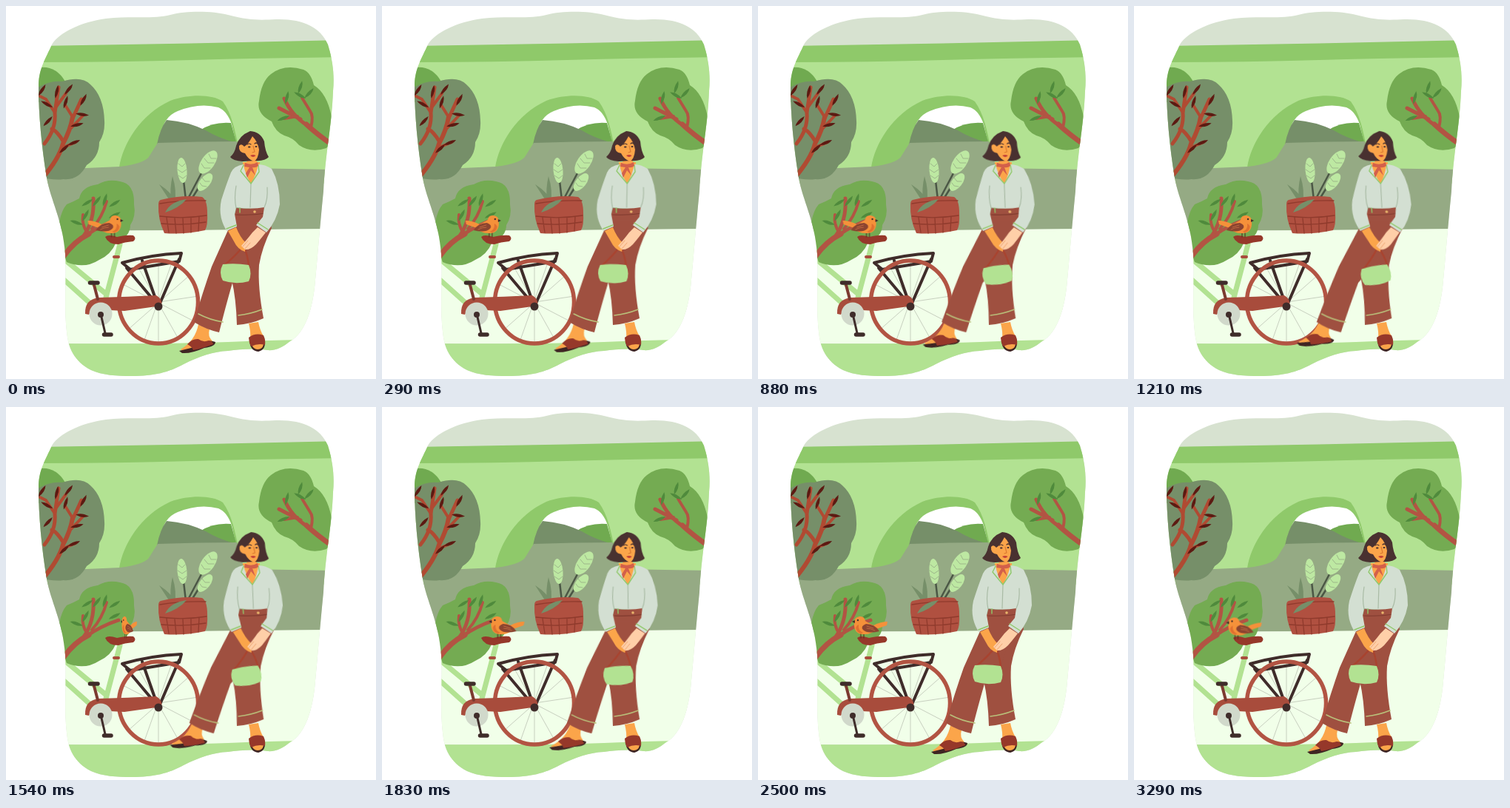
These frames come from a looping animation (500x504 px, 5 s). An HTML page without scripts:

```html
<!DOCTYPE html>
<html lang="en">
<head>
<meta charset="utf-8">
<title>Park afternoon</title>
<style>
html, body { margin: 0; width: 100%; height: 100%; overflow: hidden; background: #fff; }
svg { display: block; width: 100vw; height: 100vh; }
.line { fill: none; stroke-linecap: round; stroke-linejoin: round; }
.sway { animation: sway 5s cubic-bezier(.37, 0, .63, 1) infinite; }
.torso { --to: skewX(4.8deg); transform-origin: 0 213px; }
.front { --to: skewX(-4.6deg); transform-origin: 0 337px; }
.back { --to: skewX(-1.9deg); transform-origin: 0 430px; }
.foot { --to: translate(-13px, -3px) rotate(9deg); transform-origin: 283px 456px; }
.bag { --to: translate(9px, 1px) rotate(-12deg); transform-origin: 322px 325px; }
.head { --to: rotate(2deg); transform-origin: 331px 210px; }
.bird { animation: hop 5s linear infinite; }
.open { animation: open 5s step-end infinite; }
.shut { animation: shut 5s step-end infinite; }
@keyframes sway {
  0%, 50%, 100% { transform: none; }
  25% { transform: var(--to); }
}
@keyframes hop {
  0% { transform: translate(143.5px, 311px) scaleX(1); }
  11.6% { transform: translate(148px, 311px) scaleX(1); }
  24.2% { transform: translate(147px, 311px) scaleX(1); }
  27.5% { transform: translate(150px, 311px) scaleX(1); }
  30.8% { transform: translate(162px, 311px) scaleX(-.45); }
  33% { transform: translate(162px, 311px) scaleX(-1); }
  41.6% { transform: translate(156px, 311px) scaleX(-1); }
  44.2% { transform: translate(146px, 311px) scaleX(-1); }
  50% { transform: translate(142px, 311px) scaleX(-1); }
  65%, 100% { transform: translate(139.5px, 312.5px) scaleX(-1); }
}
@keyframes open { 0%, 13.2% { opacity: 1; } 10% { opacity: 0; } }
@keyframes shut { 0%, 13.2% { opacity: 0; } 10% { opacity: 1; } }
</style>
</head>
<body>
<svg viewBox="0 0 500 504" preserveAspectRatio="none">
<defs>
  <clipPath id="blob">
    <path d="M62 52C72 36 100 22 135 17C170 13 200 18 222 12C245 6 280 7 300 12C330 20 345 19 365 18C400 17 425 28 435 52C442 75 444 95 442 115C440 165 432 195 429 250C424 300 421 340 418 370C415 410 404 442 384 453C374 461 365 466 353 465C335 462 315 464 300 466C280 467 262 473 240 484C220 495 200 500 170 500C150 500 130 499 115 492C92 480 84 462 82 440C78 405 82 370 80 335C77 290 60 262 55 232C48 190 44 145 44 110C44 85 52 75 62 52Z"/>
  </clipPath>
  <path id="leaf" d="M-9 0Q-2 -4.500 9 -1Q2 4 -9 0Z"/>
</defs>

<g clip-path="url(#blob)">
  <rect width="500" height="504" fill="#d7e2d0"/>
  <path fill="#b2e292" d="M40 60H460V240H40Z"/>
  <path fill="#8fc96a" d="M40 54L250 50.500L460 46V69Q350 70 250 73T40 76Z"/>

  <!-- arch and hills -->
  <path fill="#8fc96a" d="M153 218C158 186 182 146 222 128C250 118 280 120 293 129C305 145 310 170 314 190L204 190L195 218Z"/>
  <path fill="#fff" d="M210 175Q212 150 232 142Q261 130 287 137Q299 142 305 160L311 186H206Z"/>
  <path fill="#70aa50" d="M262 168Q280 156 304 158L312 187H262Z"/>
  <path fill="#768f69" d="M204 187Q208 166 217 154Q245 156 270 168Q286 178 311 185V190H204Z"/>
  <path fill="#95aa84" d="M40 222L154 217Q186 213 193 204Q199 194 205 185Q260 183 312 183L322 219L450 221V301L250 303L40 304Z"/>
  <path fill="#f1ffe9" d="M40 304L250 303L450 301V456H40Z"/>
  <path fill="#b2e292" d="M60 456Q220 457 300 454T450 450V504H60Z"/>

  <!-- left tree -->
  <path fill="#70aa50" d="M40 84Q66 78 80 102L70 130H40Z"/>
  <path fill="#768f69" d="M40 112Q58 100 76 102Q102 94 114 106Q132 122 133 155Q134 172 126 184Q126 204 109 215Q98 236 78 234Q62 236 40 230Z"/>
  <g class="line" stroke="#b04a32">
    <path stroke-width="6" d="M48 234Q72 206 77 186Q87 168 90 150"/>
    <path stroke-width="5" d="M52 186Q68 166 66 144L71 110M90 152L102 126M78 184Q70 170 62 166"/>
    <path stroke-width="4" d="M66 144L54 126L46 122M68 136L81 118M87 166L104 148M90 150L80 134M75 192L94 184"/>
  </g>
  <g fill="#5c1a12">
    <use href="#leaf" x="49" y="114" transform="rotate(-55 49 114)"/>
    <use href="#leaf" x="69" y="116" transform="rotate(-75 69 116)"/>
    <use href="#leaf" x="85" y="113" transform="rotate(-50 85 113)"/>
    <use href="#leaf" x="81" y="130" transform="rotate(-70 81 130)"/>
    <use href="#leaf" x="105" y="127" transform="rotate(-60 105 127)"/>
    <use href="#leaf" x="103" y="147" transform="rotate(10 103 147)"/>
    <use href="#leaf" x="96" y="161" transform="rotate(-12 96 161)"/>
    <use href="#leaf" x="57" y="156" transform="rotate(-45 57 156)"/>
    <use href="#leaf" x="92" y="185" transform="rotate(-20 92 185)"/>
    <use href="#leaf" x="79" y="193" transform="rotate(-40 79 193)"/>
    <use href="#leaf" x="55" y="133" transform="rotate(30 55 133)"/>
  </g>

  <!-- right tree -->
  <path fill="#74ab52" d="M358 92Q376 78 402 86Q412 90 416 107Q434 118 440 150Q446 180 433 192Q412 199 396 188Q388 178 376 175Q364 170 359 156Q338 146 342 128Q345 102 358 92Z"/>
  <g class="line" stroke="#b25443">
    <path stroke-width="7" d="M440 187Q420 173 406 160"/>
    <path stroke-width="5" d="M408 162Q386 148 376 125M398 153L369 138"/>
    <path stroke-width="4" d="M412 164Q416 148 411 142L400 124M394 149L376 152"/>
  </g>
  <g fill="#4f8a3c">
    <use href="#leaf" x="398" y="110" transform="rotate(-70 398 110)"/>
    <use href="#leaf" x="410" y="118" transform="rotate(-45 410 118)"/>
    <use href="#leaf" x="397" y="121" transform="rotate(30 397 121)"/>
    <use href="#leaf" x="380" y="124" transform="rotate(-75 380 124)"/>
    <use href="#leaf" x="375" y="152" transform="rotate(-20 375 152)"/>
  </g>

  <!-- bicycle frame -->
  <g class="line" stroke="#b2e292" stroke-width="7">
    <path d="M154 322L135 394M76 340L134 388M74 366L114 402"/>
  </g>

  <!-- low bush -->
  <path fill="#74ab52" d="M82 268Q92 264 99 260Q102 244 124 241Q138 233 154 237Q174 240 173 268Q176 284 168 296Q168 312 149 319Q142 336 126 343Q106 356 82 346Q68 310 72 292Q75 276 82 268Z"/>
  <g class="line" stroke="#b25443">
    <path stroke-width="7" d="M78 338Q92 318 112 308"/>
    <path stroke-width="5" d="M108 310Q128 296 152 288M104 312Q120 290 118 260"/>
    <path stroke-width="4" d="M116 301Q130 286 136 264M110 306Q102 296 104 282"/>
  </g>
  <g fill="#4f8a3c">
    <use href="#leaf" x="110" y="266" transform="rotate(-30 110 266)"/>
    <use href="#leaf" x="123" y="264" transform="rotate(-50 123 264)"/>
    <use href="#leaf" x="134" y="262" transform="rotate(-70 134 262)"/>
    <use href="#leaf" x="147" y="267" transform="rotate(-30 147 267)"/>
    <use href="#leaf" x="147" y="283" transform="rotate(-25 147 283)"/>
    <use href="#leaf" x="108" y="283" transform="rotate(-60 108 283)"/>
    <use href="#leaf" x="95" y="293" transform="rotate(20 95 293)"/>
  </g>
</g>

<!-- basket with plants -->
<g class="line" stroke="#4b5745" stroke-width="2.500">
  <path d="M240 236L243 262M264 226L245 262M260 246L250 262"/>
</g>
<g fill="#bde8a2">
  <ellipse cx="238" cy="222" rx="6.500" ry="17" transform="rotate(-5 238 222)"/>
  <ellipse cx="273" cy="211" rx="9" ry="18" transform="rotate(35 273 211)"/>
  <ellipse cx="269" cy="238" rx="7" ry="14" transform="rotate(38 269 238)"/>
</g>
<path class="line" stroke="#95aa84" stroke-width=".8" d="M233 213L238 217L242 213M232 221L238 225L244 221M233 229L239 233L244 229M274 200L277 206L284 206M268 206L273 212L281 212M264 213L268 219L276 219M265 232L269 237L275 237M262 239L265 243L271 244"/>
<g fill="#768f69">
  <path d="M207 241Q224 252 229 264L222 264ZM225 230Q231 250 228 264H223Q221 246 225 230Z"/>
</g>
<path fill="#b05040" d="M209 262Q238 255 265 258Q272 262 272 280Q273 296 269 303Q240 309 214 307Q205 288 206 268Q206 263 209 262Z"/>
<path class="line" stroke="#8f3a2c" stroke-width="1.300" d="M208 284Q240 288 271 283M210 294Q240 297 270 292M217 286L220 306M228 287L230 307M239 287L240 307M250 286V306M261 285L260 304M208 267Q238 262 270 263"/>
<path fill="#768f69" d="M215 279Q222 264 244 261Q234 273 215 279Z"/>

<!-- bicycle -->
<path class="line" stroke="#c7cfbf" stroke-width="1" d="M206 346V455M178 352L232 448M158 376L254 426M153 408L260 392M164 438L248 364M186 454L224 347"/>
<g class="line" stroke="#3f2c2a" stroke-width="4">
  <path d="M157 347Q195 336 237 334L234 345L168 356ZM163 354L205 404M184 344L205 404M234 342L207 404"/>
</g>
<ellipse cx="206" cy="400" rx="53.500" ry="56" fill="none" stroke="#b25443" stroke-width="5.500"/>
<path fill="#a84c3c" d="M107 416Q106 396 126 394Q165 393 203 391Q212 396 210 405L160 412L140 411Q128 396 116 410L112 417Z"/>
<circle cx="206" cy="406" r="5.500" fill="#3f2c2a"/>
<circle cx="128" cy="416" r="15.500" fill="#d1d9cb"/>
<g class="line" stroke="#3f2c2a">
  <path stroke="#7c3a30" stroke-width="4" d="M119 377L124 396"/>
  <path stroke-width="3" d="M128 416L134 442"/>
  <path stroke-width="5.500" d="M113.500 374H124M132.500 444H142"/>
</g>
<circle cx="128" cy="417" r="4" fill="#3f2c2a"/>
<path fill="#96382a" d="M134 312Q138 308 150 312Q164 309 172 310Q177 314 172 318Q160 319 152 322Q138 322 134 312Z"/>
<path class="line" stroke="#a84c3c" stroke-width="4" d="M146 339H152"/>

<!-- bird, feet at the local zero -->
<g class="bird">
  <path class="line" stroke="#5c2f22" stroke-width="1.200" d="M-1 -6L-1 1M3 -6L3 1"/>
  <path fill="#f5913a" d="M-33 -21Q-24 -21 -14 -16Q-6 -20 -3 -22Q-2 -29 5 -28Q12 -27 12 -20Q13 -5 1 -4Q-12 -3 -18 -11L-32 -16Z"/>
  <path fill="#e0702f" d="M6 -17Q12 -14 8 -8Q4 -4 0 -6Q7 -9 6 -17Z"/>
  <path fill="#8b4430" d="M-22 -8Q-16 -18 -4 -18Q4 -15 0 -10Q-6 -4 -22 -8Z"/>
  <path class="line" stroke="#c06a43" stroke-width="1" d="M-16 -9Q-10 -12 -5 -12M-14 -12L-5 -15"/>
  <path fill="#3f2c2a" d="M11 -23L15 -21L11 -19Z"/>
  <circle cx="7" cy="-23" r="1.200" fill="#3f2c2a"/>
</g>

<!-- woman -->
<g class="sway back">
  <path fill="#9f5040" d="M312 278L351 276Q357 290 359 300Q346 326 342 350Q340 380 348 422Q330 430 312 431Q311 395 305 370Z"/>
  <path class="line" stroke="#b9c07a" stroke-width="1.600" d="M314 418Q331 416 346 410"/>
</g>
<path fill="#fba54a" d="M328 429L341 427Q343 438 348 446L330 450Q331 440 328 429Z"/>
<path fill="#3f2523" d="M329 450Q338 440 349 448Q353 464 341 467Q329 466 329 450Z"/>
<path fill="#fba54a" d="M332 457H348Q347 464 340 464Q334 464 332 457Z"/>
<path fill="#96382a" d="M328 448Q337 441 348 445Q351 452 350 458Q341 455 331 460Q328 454 328 448Z"/>

<g class="sway foot">
  <path fill="#fba54a" d="M260 430L275 437Q272 446 279 453L250 464Q238 467 236 464Q256 452 260 430Z"/>
  <path fill="#3f2523" d="M234 466Q246 463 258 460Q272 449 283 454Q283 460 268 462Q250 470 238 469Z"/>
  <path fill="#96382a" d="M245 457Q252 449 260 450Q266 455 274 452Q280 453 280 457Q268 462 253 465Q251 460 245 457Z"/>
</g>
<g class="sway front">
  <path fill="#9f5040" d="M311 276Q307 290 300 303L278 352Q266 386 254 427Q270 437 288 441Q297 405 306 374L330 345L351 276Z"/>
  <path class="line" stroke="#b9c07a" stroke-width="1.600" d="M260 416Q275 424 293 427"/>
</g>

<g class="sway bag">
  <path class="line" stroke="#a8432f" stroke-width="2.500" d="M294 351Q310 338 321 324Q327 338 328 351"/>
  <path fill="#b2e292" d="M293 349Q310 347 328 350Q333 362 328 372Q310 377 293 371Q287 360 293 349Z"/>
</g>

<g class="sway torso">
  <path fill="#fba54a" d="M320 211H343L340 244H322Z"/>
  <path fill="#9f5040" d="M311 273Q332 275 351 271L352 290H309Z"/>
  <path class="line" stroke="#7f3a2e" stroke-width="1.200" d="M311 282Q332 283 351 280"/>
  <circle cx="336" cy="278" r="1.800" fill="#e9b56b"/>
  <path fill="#d3dfd2" d="M321 214Q308 216 304 225Q298 240 291 262Q287 280 294 296L298 304L312 298L309 281L311 272Q331 275 349 272L347 285L338 296L352 306Q366 290 370 268Q370 240 359 220Q350 214 341 214Q338 229 331 240Q323 228 321 214Z"/>
  <path class="line" stroke="#a9bba5" stroke-width="1.200" d="M331 240L330 272M311 243Q308 260 311 273M353 245Q354 262 349 272"/>
  <path class="line" stroke="#8fc96a" stroke-width="1.400" d="M321 215L317 223L331 240L342 224L341 215M298 301L311 296M340 293L354 302M316 273V279"/>
  <path fill="#fba54a" d="M300 304L311 299Q316 312 324 320L323 332Q313 329 308 318Z"/>
  <path fill="#ffcfa8" d="M340 299L351 306Q344 315 338 322Q330 330 323 329L318 324Q327 314 333 306Z"/>
  <path class="line" stroke="#e79a64" stroke-width=".8" d="M320 325L327 317M323 328L330 320"/>
</g>

<path fill="#fba54a" d="M326 200H339V216Q332 219 325 215Z"/>
<path fill="#d3604a" d="M323 212Q332 216 340 211L341 216Q337 219 333 218L337 229L331 222L326 232L324 226L329 218L322 217Z"/>

<g class="sway head">
  <path fill="#493130" d="M311 189Q315 175 330 169Q344 170 349 183Q350 196 355 204Q350 210 336 209L320 210Q306 209 303 204Q309 199 311 189Z"/>
  <path fill="#fba54a" d="M333 176Q340 183 342 194Q341 207 335 210Q327 207 323 199Q314 198 315 189Q318 185 322 190Q328 186 333 176Z"/>
  <g class="line" stroke="#493130">
    <path stroke-width="1.200" d="M326 187Q328 185 331 187M336 186Q338 184 340 186"/>
    <path class="open" stroke-width="1.900" d="M328 190.500H329.500M337.500 190H338.500"/>
    <path class="shut" stroke-width="1.100" d="M326 190Q328 192 331 190M336 189.500Q338 191.500 340.500 189.500"/>
  </g>
  <path class="line" stroke="#d9772f" stroke-width="1.100" d="M334 189L336 197L333 198"/>
  <path fill="#c23f35" d="M330 202Q334 200 337.500 202Q334 206 330 202Z"/>
</g>
</svg>
</body>
</html>
```
